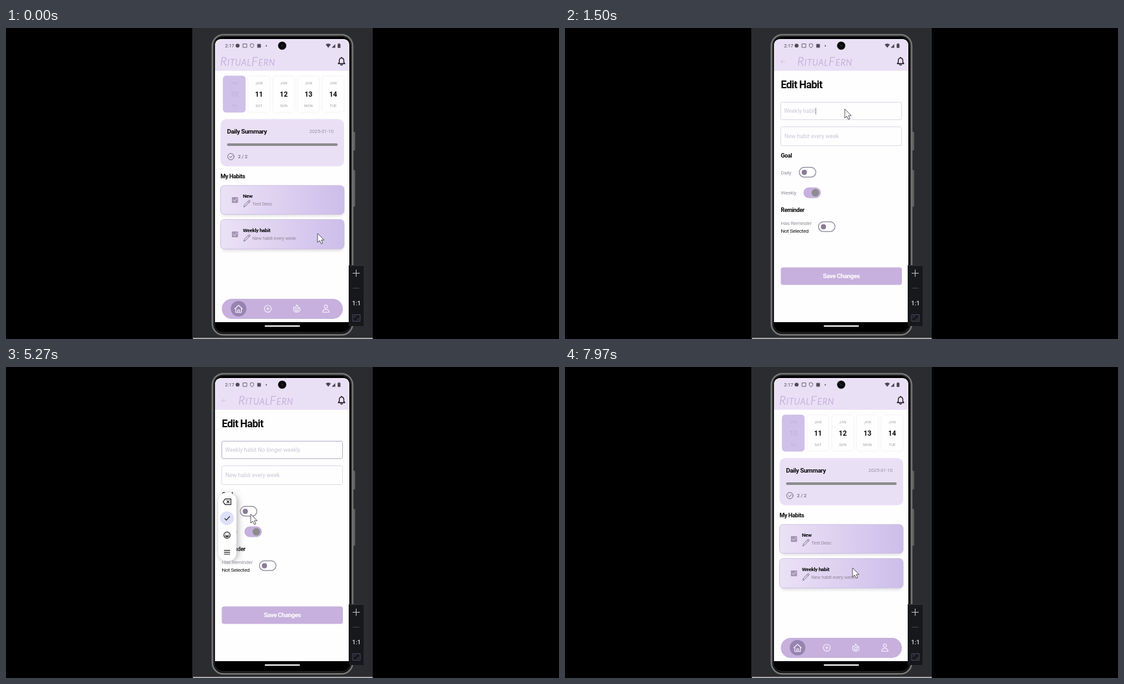
Write an HTML page that moves like this. It is 852 by 480 pixels and loops after 8000 ms.

```html
<!DOCTYPE html>
<html lang="en">
<head>
<meta charset="utf-8">
<title>Habit editing</title>
<style>
html, body { margin: 0; width: 100%; height: 100%; overflow: hidden; background: #000; }
svg { display: block; width: 100%; height: 100%; }
text { font-family: Roboto, sans-serif; white-space: pre; }
.b { font-weight: 700; letter-spacing: -.04em; fill: #0b0b0d; }
.r { letter-spacing: -.035em; }
.mid { text-anchor: middle; }
.logo { font: italic 300 18px Lato, sans-serif; font-variant: small-caps; letter-spacing: .9px; fill: #c4b2dc; stroke: #c4b2dc; stroke-width: .5; }
.line { fill: none; stroke-linecap: round; stroke-linejoin: round; }
.page { fill: #fefefe; }
.pale { fill: #eae0f6; }
.accent { fill: #c7b0dd; }
.habit { fill: url(#card); stroke: #c9bbdc; stroke-width: .8; }
.shade { fill: #c9c6d2; filter: url(#low); opacity: .6; }
</style>
</head>
<body>
<svg viewBox="0 0 852 480" xmlns="http://www.w3.org/2000/svg">
  <defs>
    <linearGradient id="card">
      <stop offset="0" stop-color="#ebe2f6"/>
      <stop offset="1" stop-color="#cdbdea"/>
    </linearGradient>
    <linearGradient id="pen">
      <stop offset="0" stop-color="#a3a3a5"/>
      <stop offset=".35" stop-color="#6f6f70"/>
      <stop offset="1" stop-color="#6f6f70"/>
    </linearGradient>
    <clipPath id="screen"><path d="M322 454V28Q322 17 333 17H518Q529 17 529 28V454Z"/></clipPath>
    <filter id="soft" x="-80%" y="-30%" width="260%" height="160%"><feGaussianBlur stdDeviation="5"/></filter>
    <filter id="low" x="-10%" y="-30%" width="120%" height="170%"><feGaussianBlur stdDeviation="2"/></filter>
    <g id="pencil"><path class="line" d="M-4.5 5L-3.5 1.8L3 -4.7Q4 -5.4 4.8 -4.6T4.7 -2.9L-1.8 3.7ZM2 -3.6L3.7 -1.9" stroke="#807888"/></g>
    <g id="tick">
      <rect x="348" y="-4.5" width="9.5" height="9" rx="1" fill="#a397b2"/>
      <path class="line" d="M350 0l2 2 3.700-4" stroke="#e9e0f5"/>
    </g>
  </defs>

  <rect width="852" height="480"/>
  <rect x="287" width="278" height="479" fill="#2b2c30"/>
  <rect x="288" y="478.300" width="277" height="1.700" fill="#b9b9b9"/>

  <!-- phone body -->
  <g fill="#5d5d5b">
    <rect x="534" y="160" width="4" height="29" rx="1.500"/>
    <rect x="534" y="219" width="4" height="57" rx="1.500"/>
  </g>
  <rect x="318" y="10.500" width="216" height="463" rx="17" fill="#0a0a0c" stroke="#777775" stroke-width="2.500"/>
  <rect x="320.500" y="13" width="211" height="457" rx="14" stroke="#38383a"/>

  <g clip-path="url(#screen)">
    <rect class="page" x="322" y="16" width="207" height="438"/>
    <rect class="pale" x="322" y="16" width="207" height="50"/>

    <g id="home">
      <text class="logo" x="330" y="58">RitualFern</text>
      <g id="days"></g>
      <rect class="pale" x="330.500" y="140.500" width="190.500" height="73" rx="9"/>
      <text class="b" x="340.500" y="163" font-size="9.800">Daily Summary</text>
      <text x="467.500" y="162" font-size="7.400" fill="#98929e">2025-01-10</text>
      <path class="line" d="M342.500 180H509" stroke="#8b8b8c" stroke-width="4"/>
      <g class="line" stroke="#605b66" stroke-width=".9">
        <circle cx="346.500" cy="198.500" r="4.900"/><path d="M344.300 198.500l1.700 1.700 2.900-3.200"/>
      </g>
      <text x="357.500" y="201.200" font-size="7.200" fill="#514c57">2 / 2</text>
      <text class="b" x="330.500" y="232" font-size="9">My Habits</text>

      <rect class="shade" x="332" y="246" width="188" height="44" rx="6"/>
      <rect class="habit" x="330.500" y="243" width="190.500" height="44.500" rx="6"/>
      <use href="#tick" y="265.500"/>
      <text class="b" x="365" y="262" font-size="8">New</text>
      <use href="#pencil" x="371" y="271"/>
      <text class="r" x="379.500" y="274" font-size="7.500" fill="#938b9c">Test Desc</text>

      <g id="actions">
        <rect x="425.500" y="295.500" width="48" height="45.500" rx="6" fill="url(#pen)"/>
        <path class="line" d="M445.500 322l7-7" stroke="#f4f4f4" stroke-width="3"/>
        <rect x="473.500" y="295.500" width="47.500" height="45.500" rx="6" fill="#f00000"/>
        <path d="M493.500 315.200h2l.6-.9h2.300l.6.9h2v1.200h-7.500zM494 317h6.500v5.500q0 1.300-1.300 1.300h-3.900q-1.300 0-1.300-1.300z" fill="#fff"/>
      </g>
      <g id="swipe">
        <rect class="shade" x="332" y="299" width="188" height="45" rx="6"/>
        <rect class="habit" x="330.500" y="295.500" width="190.500" height="45.500" rx="6"/>
        <use href="#tick" y="318.500"/>
        <text class="b" x="365" y="315" font-size="8">Weekly habit</text>
        <use href="#pencil" x="371" y="324"/>
        <text class="r" x="379.500" y="327" font-size="7.500" fill="#938b9c">New habit every week</text>
      </g>

      <rect class="accent" x="332.500" y="418" width="186.500" height="31" rx="15.500"/>
      <circle cx="358.300" cy="433.300" r="12" fill="#9784b0"/>
      <g class="line" stroke="#f8f3ff" stroke-width="1.100">
        <path d="M352.500 433.500l5.800-5.500 5.800 5.500M354 432.500v6.500h8.600v-6.500M356.900 439v-4h2.800v4"/>
        <circle cx="403.300" cy="433.300" r="5.300"/><path d="M401.300 433.300h4M403.300 431.300v4"/>
        <path d="M443.500 430.500q-2.200 8 4.500 8.200 6.700-.2 4.500-7.200l-1.700 1.100q-.3-3.600-3.300-5.100.2 2.800-1.700 3.900z"/><circle cx="448" cy="434.800" r="2"/>
        <circle cx="492.800" cy="430" r="2.500"/><path d="M488 438.800q0-4.500 4.800-4.500t4.800 4.500z"/>
      </g>
    </g>

    <g id="edit">
      <rect class="page" x="322" y="40" width="207" height="414"/>
      <rect class="pale" x="322" y="40" width="207" height="26"/>
      <path class="line" d="M339 52h-6.500m2.700-2.700l-2.700 2.700 2.700 2.700" stroke="#d3c3e6"/>
      <text class="logo" x="358" y="58">RitualFern</text>
      <text class="b" x="332.500" y="93" font-size="16">Edit Habit</text>
      <rect id="field" x="332.500" y="114.500" width="186" height="27" rx="2" fill="none"/>
      <rect x="332.500" y="152.500" width="186" height="29" rx="2" fill="none" stroke="#dfdbe6"/>
      <text id="name" x="337.500" y="131.300" font-size="8.600" fill="#cdc6d8"></text>
      <rect id="caret" y="123" width="1" height="10.500" fill="#958ca2"/>
      <text x="338" y="170.300" font-size="8.700" fill="#cdc6d8">New habit every week</text>
      <text class="b" x="332.500" y="199.500" font-size="9">Goal</text>
      <g class="r" font-size="8.100" fill="#98919f">
        <text x="332.500" y="225.500">Daily</text>
        <text x="332.500" y="257">Weekly</text>
        <text x="332.500" y="304">Has Reminder</text>
        <text x="332.500" y="315.500" fill="#151517">Not Selected</text>
      </g>
      <text class="b" x="332.500" y="283.500" font-size="9">Reminder</text>
      <g id="toggles"></g>
      <rect class="accent" x="332.500" y="369.500" width="186.500" height="27" rx="3.500"/>
      <text class="b mid" x="425.700" y="386.300" font-size="9.700" style="fill:#fff">Save Changes</text>
    </g>

    <g id="keys">
      <rect x="328" y="196" width="30" height="104" rx="13" fill="#9f9fa4" filter="url(#soft)" opacity=".7"/>
      <rect x="327" y="194" width="28" height="105" rx="12" fill="#fefefe"/>
      <circle cx="340.500" cy="233.500" r="10.700" fill="#dedff9"/>
      <g class="line" stroke="#222226" stroke-width="1.200">
        <path d="M334.500 208l3.200-4.300h8.800v8.600h-8.800zM340.300 206.200l3.600 3.600m0-3.600l-3.600 3.600"/>
        <path d="M337 233.800l2.500 2.500 5-5.300"/>
        <circle cx="340.500" cy="259.500" r="4.800"/><path d="M338.700 258v.1m3.600-.1v.1M338 260.700q2.500 3.200 5 0z"/>
        <path d="M336.300 283.200h8.500m-8.500 2.900h8.500m-8.500 2.900h8.500"/>
      </g>
    </g>

    <!-- status bar and bell -->
    <text x="337.500" y="30" font-size="7.400" fill="#4f4a55">2:17</text>
    <circle cx="356.800" cy="27.300" r="3" fill="#4f4a55"/>
    <g class="line" stroke="#6c6674" stroke-width="1">
      <path d="M365.500 24.500h5.500v5.500h-5.500zM379 24.200l2.600 1v2.300q-.4 2.200-2.600 3.200-2.200-1-2.600-3.200v-2.300z"/>
      <rect x="387.800" y="25" width="4.500" height="5" fill="#4f4a55"/>
    </g>
    <circle cx="401" cy="27.500" r="1" fill="#4f4a55"/>
    <g fill="#4b4651">
      <path d="M492.500 25.500q4-3.200 8 0l-4 5zM501.800 30.500l5.500-5.800v5.800z"/>
      <rect x="511" y="24.500" width="4.300" height="6.200" rx=".6"/><rect x="512.200" y="23.700" width="2" height="1"/>
    </g>
    <path class="line" d="M512 55h10l-1.500-2v-3.200q-.2-3.200-3.500-3.700-3.300.5-3.500 3.700v3.200zM517 46v-.8M515.600 56.800q1.400 1.200 2.800 0" stroke="#131316" stroke-width="1.300"/>
  </g>
  <circle cx="425.500" cy="27.300" r="6.300" fill="#08080a"/>
  <circle cx="425.500" cy="27.300" r="2" fill="#1d1d24"/>
  <path class="line" d="M399.500 460H452" stroke="#fff" stroke-width="1.800"/>

  <!-- zoom panel -->
  <rect x="528" y="366" width="23" height="94" fill="#17181c"/>
  <path d="M528 366.500H551" stroke="#35363a"/>
  <path d="M534 378.500h11m-5.500-5.500v11" stroke="#c3c4c8"/>
  <path d="M534.500 401.500h10" stroke="#434449"/>
  <text class="mid" x="540" y="428" font-size="9.500" font-weight="500" fill="#dcdce0">1:1</text>
  <path class="line" d="M534.500 442.500h11v10h-11zM537 447v-2h2m4 3v2h-2" stroke="#4b4b62"/>

  <path id="mouse" d="M0 0V14L3.200 11 5.600 16 8 15 5.700 10.200H10Z" fill="#fff" stroke="#47464a" stroke-width=".9" stroke-linejoin="round"/>
</svg>
<script>
const LOOP = 8000;
const $ = id => document.getElementById(id);

function add(parent, tag, attrs, text) {
  const el = document.createElementNS("http://www.w3.org/2000/svg", tag);
  for (const k in attrs) el.setAttribute(k, attrs[k]);
  if (text) el.textContent = text;
  return parent.appendChild(el);
}

["FRI", "SAT", "SUN", "MON", "TUE"].forEach((day, i) => {
  const x = 351.7 + i * 38.1, on = i === 0, g = $("days");
  add(g, "rect", { x: x - 17, y: 74, width: 34, height: 56, rx: 4.5,
    fill: on ? "#cfc0e9" : "none", stroke: on ? "#c8b8e2" : "#f1eff4", "stroke-width": .8 });
  const put = (s, y, size, fill, weight) =>
    add(g, "text", { class: "mid", x, y, "font-size": size, fill, "font-weight": weight }, s);
  const small = on ? "#bfaedb" : "#a5a2a9";
  put("JAN", 87, 5.9, small, 400);
  put(10 + i, 105.8, 10.6, on ? small : "#0b0b0d", on ? 400 : 700);
  put(day, 122, 5.9, small, 400);
});

function toggle(x, y) {
  const g = $("toggles");
  const track = add(g, "rect", { x, y: y - 7.5, width: 25.5, height: 15, rx: 7.5, "stroke-width": 1.2 });
  const thumb = add(g, "circle", { cy: y });
  return on => {
    track.setAttribute("fill", `rgba(199,176,221,${on})`);
    track.setAttribute("stroke", on > .5 ? "#c0aad6" : "#8d8496");
    thumb.setAttribute("cx", x + 7.7 + on * 10);
    thumb.setAttribute("r", 4 + on * 1.8);
    thumb.setAttribute("fill", on > .5 ? "#8b8b8c" : "#8a7a98");
  };
}
const daily = toggle(361, 222.7), weekly = toggle(368, 254.3);
toggle(390.5, 306.7)(0);

// Rows are [time, ...values]; values ease between rows.
function at(rows, t) {
  let i = rows.length - 1;
  while (i > 0 && rows[i][0] > t) i--;
  const a = rows[i], b = rows[i + 1] || a;
  const p = b === a ? 0 : Math.max(0, Math.min(1, (t - a[0]) / (b[0] - a[0])));
  const e = p * p * (3 - 2 * p);
  return a.slice(1).map((v, k) => v + (b[k + 1] - v) * e);
}

const mousePath = [
  [30, 480, 317], [400, 444, 316.5], [840, 444, 316.5], [1230, 431, 125],
  [4470, 431, 125], [5270, 377, 227], [5500, 377, 227],
  [6300, 430, 381], [6700, 430, 381], [7900, 443, 310]
];
const swipeX = [[60, 0], [300, -36], [560, -96], [6500, -96], [6501, 0]];
const editShow = [[800, 0], [1060, 1], [6520, 1], [6800, 0]];
const keysShow = [[2030, 0], [2400, 1], [6500, 1], [6700, 0]];
const focus = [[1500, 0], [1670, 1]];
const swap = [[5320, 0], [5520, 1]];
const typed = " No longer weekly";
const strokes = [2030, 2370, 2430, 2530, 2600, 2700, 2900, 2930, 3600,
  3640, 3700, 3770, 3830, 4000, 4270, 4470, 4530];
// Each of these starts the caret blink afresh.
const blinks = [500, 1500, ...strokes, swap[0][0]];

function draw(t) {
  const [mx, my] = at(mousePath, t);
  $("mouse").setAttribute("transform", `translate(${mx} ${my})`);

  const [dx] = at(swipeX, t);
  $("swipe").setAttribute("transform", `translate(${dx} 0)`);
  $("actions").style.visibility = dx < -1 ? "visible" : "hidden";

  const [edit] = at(editShow, t);
  $("edit").style.opacity = edit;

  const [k] = at(keysShow, t);
  $("keys").style.opacity = k;
  $("keys").setAttribute("transform", `translate(${-10 * (1 - k)} 0)`);

  const [f] = at(focus, t);
  $("field").setAttribute("stroke", `rgb(${223 - 37 * f},${219 - 42 * f},${230 - 30 * f})`);

  const name = $("name");
  name.textContent = "Weekly habit" + typed.slice(0, strokes.filter(s => s <= t).length);
  $("caret").setAttribute("x", 337.5 + name.getComputedTextLength());
  const last = Math.max(0, ...blinks.filter(b => b <= t));
  $("caret").style.opacity = t >= 1500 && (t - last) % 1000 < 500 ? 1 : 0;

  const [s] = at(swap, t);
  daily(s);
  weekly(1 - s);
}

const start = performance.now();
function tick(now) {
  draw(Math.max(0, now - start) % LOOP);
  requestAnimationFrame(tick);
}
draw(0);
requestAnimationFrame(tick);
</script>
</body>
</html>
```
